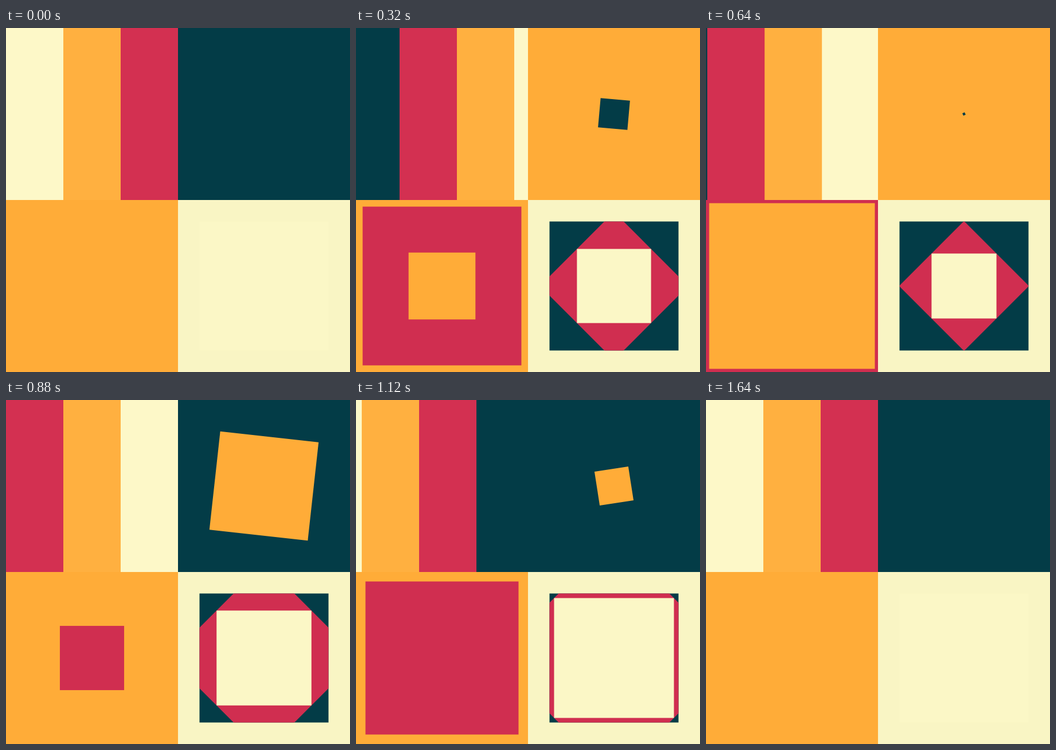
An HTML page with a canvas that plays this animation: 600 by 600 pixels, repeating every 1.68 s.

```html
<!DOCTYPE html>
<html lang="en">
<head>
<meta charset="utf-8">
<title>Four tiles</title>
<style>
  html, body { margin: 0; height: 100%; overflow: hidden; }
  canvas { display: block; }
</style>
</head>
<body>
<canvas id="stage" width="600" height="600"></canvas>
<script>
const ctx = document.getElementById('stage').getContext('2d');
const LOOP = 1680, STEP = 40, TILE = 300;
const DARK = '#033c47', RED = '#d02e50', ORANGE = '#ffac38';
const PALE = '#f9f5c4', CREAM = '#fbf7c6';
const BARS = ['#fdf8c8', '#ffb040', '#d33051', DARK, '#d33051', '#ffb040', '#fdf8c8'];

const progress = (t, start, length) => Math.min(1, Math.max(0, (t - start) / length));
const smooth = x => x * x * (3 - 2 * x);
// Instant start, long slow landing
const land = (t, start, length) => smooth(Math.cbrt(progress(t, start, length)));

function square(size, color) {
  ctx.fillStyle = color;
  ctx.fillRect(-size / 2, -size / 2, size, size);
}

function clipSquare(size) {
  ctx.beginPath();
  ctx.rect(-size / 2, -size / 2, size, size);
  ctx.clip();
}

// Runs paint with the origin at the tile's centre
function tile(col, row, paint, t) {
  ctx.save();
  ctx.translate((col + 0.5) * TILE, (row + 0.5) * TILE);
  clipSquare(TILE);
  paint(t);
  ctx.restore();
}

function slidingBars(t) {
  const shift = 400 * (land(t, 80, 640) - land(t, 880, 720));
  BARS.forEach((color, i) => {
    ctx.fillStyle = color;
    ctx.fillRect(i * 100 - shift - TILE / 2, -TILE / 2, 100, TILE);
  });
}

function spinningSquare(t) {
  const second = t >= 800;
  const [start, length] = second ? [800, 880] : [0, 800];
  square(TILE, second ? DARK : ORANGE);
  ctx.rotate(smooth(progress(t, start, length)) * Math.PI * 1.5);
  const size = TILE * (1 - land(t, start, length));
  if (size > 0.4) square(size, second ? ORANGE : DARK);
}

function growingSquares(t) {
  square(TILE, ORANGE);
  for (const start of [0, 840]) {
    square(TILE * land(t, start, 560), RED);
    square(TILE * land(t, start + 280, 520), ORANGE);
  }
}

function diamondWindow(t) {
  const size = 225;
  const radius = size * (1 - (land(t, 0, 740) - land(t, 800, 720)) / 2);
  square(TILE, PALE);
  if (radius < size - 0.1) {
    square(size, DARK);
    ctx.save();
    clipSquare(size);
    ctx.rotate(Math.PI / 4);
    square(radius * Math.SQRT2, RED);
    ctx.restore();
  }
  square(radius, CREAM);
}

function draw(now) {
  const t = Math.floor(now % LOOP / STEP) * STEP;
  tile(0, 0, slidingBars, t);
  tile(1, 0, spinningSquare, t);
  tile(0, 1, growingSquares, t);
  tile(1, 1, diamondWindow, t);
}

const begin = performance.now();
function frame() {
  draw(performance.now() - begin);
  requestAnimationFrame(frame);
}
frame();
</script>
</body>
</html>
```
